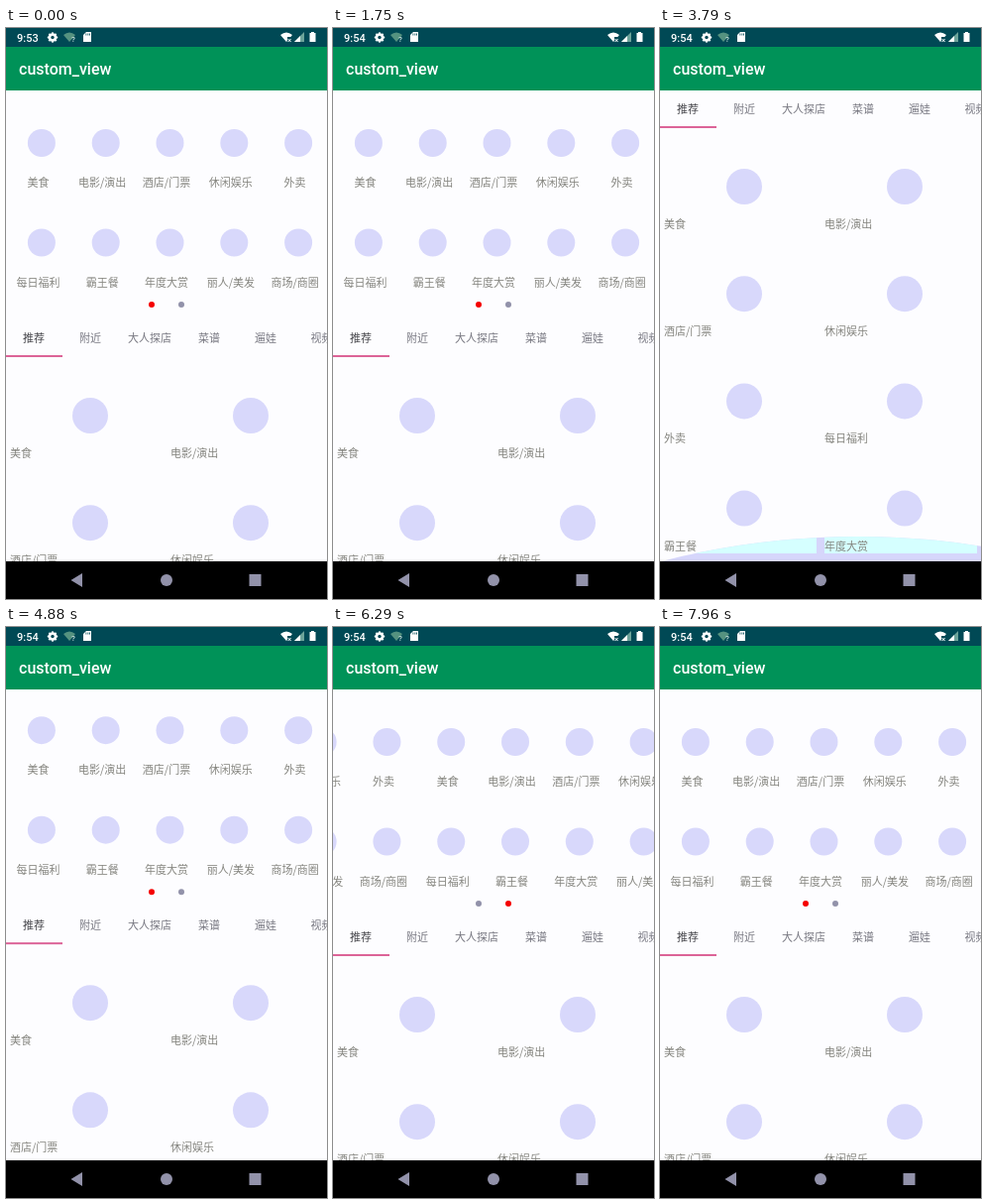
Recreate the animation shown at these times as an HTML page with a canvas. Size 324 by 576 pixels, loop 8000 ms.

```html
<!DOCTYPE html>
<html lang="zh">
<head>
<meta charset="utf-8">
<title>custom_view</title>
<style>
html, body { margin: 0; width: 100%; height: 100%; overflow: hidden; background: #fdfdff; }
canvas { display: block; width: 324px; height: 576px; }
</style>
</head>
<body>
<canvas id="stage"></canvas>
<script>
const W = 324, H = 576, LOOP = 8000, NAV_TOP = 538, BAR_BOTTOM = 63;
const COLLAPSE = 231;            // scroll distance that hides the category pager
const CELL = W / 5;
const CJK = '"Noto Sans CJK SC", "Noto Sans CJK", sans-serif';
const LATIN = 'Roboto, sans-serif';
const LAVENDER = '#d8d8fb', MUTED = '#9292aa', LABEL = '#85857f';
const items = ['美食', '电影/演出', '酒店/门票', '休闲娱乐', '外卖',
               '每日福利', '霸王餐', '年度大赏', '丽人/美发', '商场/商圈'];
const tabs = [['推荐', 28], ['附近', 85], ['大人探店', 145], ['菜谱', 205], ['遛娃', 262], ['视频', 318.5]];

const canvas = document.getElementById('stage');
const ctx = canvas.getContext('2d');
const ratio = window.devicePixelRatio || 1;
canvas.width = W * ratio;
canvas.height = H * ratio;
ctx.scale(ratio, ratio);

const progress = (t, from, to) => Math.min(1, Math.max(0, (t - from) / (to - from)));
const easeOut = u => 1 - (1 - u) ** 3;
const smooth = u => u * u * (3 - 2 * u);

function rect(x, y, w, h, color) {
  ctx.fillStyle = color;
  ctx.fillRect(x, y, w, h);
}

function circle(x, y, r, color) {
  ctx.fillStyle = color;
  ctx.beginPath();
  ctx.arc(x, y, r, 0, 7);
  ctx.fill();
}

function polygon(color, ...points) {
  ctx.fillStyle = color;
  ctx.beginPath();
  points.forEach(([x, y]) => ctx.lineTo(x, y));
  ctx.fill();
}

function text(str, x, y, color, font = '11px ' + CJK, align = 'left') {
  ctx.font = font;
  ctx.textAlign = align;
  ctx.fillStyle = color;
  ctx.fillText(str, x, y);
}

function clipped(path, draw) {
  ctx.save();
  ctx.beginPath();
  path();
  ctx.clip();
  draw();
  ctx.restore();
}

function scrollAt(t) {
  const up = smooth(progress(t, 80, 700)) - easeOut(progress(t, 960, 1640));
  const again = smooth(progress(t, 2670, 3400)) - easeOut(progress(t, 4460, 5130));
  return COLLAPSE * (up + again);
}

function pageAt(t) {
  return smooth(progress(t, 5870, 6500)) - smooth(progress(t, 6960, 7600));
}

function drawRipple(t, pageX) {
  const fade = 1 - progress(t, 7100, 7350);
  if (t < 6880 || !fade) return;
  ctx.globalAlpha = fade;
  clipped(() => ctx.rect(pageX + 1, 163, CELL - 1, 101),
          () => circle(pageX + CELL / 2, 213, 53 * easeOut(progress(t, 6880, 7080)), LAVENDER));
  ctx.globalAlpha = 1;
}

function drawPager(t, page) {
  for (let p = 0; p < 2; p++) {
    const pageX = (p - page) * W;
    if (p) drawRipple(t, pageX);
    items.forEach((name, i) => {
      const x = pageX + (i % 5 + 0.5) * CELL, y = i < 5 ? 0 : 100.5;
      circle(x + 3.5, 116 + y, 14, i === 5 && p && t > 6880 && t < 7250 ? '#c5c5c8' : LAVENDER);
      text(name, x, 160 + y, LABEL, undefined, 'center');
    });
  }
  const selected = Math.round(page);
  [147, 177].forEach((x, i) => circle(x, 279, 3, i === selected ? '#f50000' : MUTED));
}

function drawTabs() {
  tabs.forEach(([name, x], i) => text(name, x, 317, i ? '#777780' : '#45454a', undefined, 'center'));
  rect(0, 330, 57, 2, '#dc6498');
}

function drawGrid() {
  items.forEach((name, i) => {
    const x = i % 2 * 162, y = Math.floor(i / 2) * 108.2;
    circle(x + 85, 391 + y, 18, LAVENDER);
    text(name, x + 4, 433 + y, LABEL);
  });
}

// Overscroll arc at the bottom edge of the list
function drawGlow(t) {
  const size = smooth(progress(t, 3500, 3790)) * (1 - progress(t, 3850, 4290));
  if (!size) return;
  clipped(() => ctx.arc(200, 1338 - 25 * size, 800, 0, 7), () => {
    ctx.globalCompositeOperation = 'multiply';
    rect(0, 510, W, 30, LAVENDER);
    ctx.globalCompositeOperation = 'source-over';
    rect(0, 510, 158, 20, '#d5ffff');
    rect(166, 510, 154, 20, '#d5ffff');
    text(items[6], 4, 526.5, LABEL);
    text(items[7], 166, 526.5, LABEL);
  });
}

function fan(x, color) {
  ctx.fillStyle = color;
  ctx.beginPath();
  ctx.moveTo(x, 14);
  ctx.lineTo(x - 6, 7);
  ctx.quadraticCurveTo(x, 2, x + 6, 7);
  ctx.fill();
}

function drawStatusBar(t) {
  rect(0, 0, W, 19, '#004955');
  text(t < 400 ? '9:53' : '9:54', 11, 13.5, '#fff', '500 11px ' + LATIN);

  for (let i = 0; i < 8; i++) {
    const a = i * Math.PI / 4;
    circle(47 + 4 * Math.cos(a), 9.5 + 4 * Math.sin(a), 1.2, '#fff');
  }
  circle(47, 9.5, 4, '#fff');
  circle(47, 9.5, 1.7, '#004955');

  fan(64, '#559280');
  text('?', 66, 14, '#cfe5df', '500 8px ' + LATIN);
  polygon('#fff', [81, 4], [86, 4], [86, 14], [78, 14], [78, 7]);
  [80.5, 82.5, 84.2].forEach(x => rect(x, 5.5, 0.8, 2, '#004955'));

  fan(283, '#fff');
  rect(284, 9, 6, 6, '#004955');
  text('×', 284, 14.5, '#fff', '500 8px ' + LATIN);
  polygon('#6da49a', [301, 4], [301, 14], [291, 14]);
  polygon('#fff', [297, 8], [297, 14], [291, 14]);
  rect(306.5, 5, 6, 9, '#fff');
  rect(308, 4, 3, 1, '#fff');
}

function drawChrome(t) {
  drawStatusBar(t);
  rect(0, 19, W, BAR_BOTTOM - 19, '#009258');
  text('custom_view', 13, 47, '#fff', '500 16px ' + LATIN);
  rect(0, NAV_TOP, W, H - NAV_TOP, '#000');
  polygon(MUTED, [65.5, 557], [77, 550], [77, 564]);
  circle(162, 557, 6, MUTED);
  rect(245.5, 551, 12, 12, MUTED);
}

function draw(now) {
  const t = now % LOOP, scroll = scrollAt(t);
  rect(0, 0, W, H, '#fdfdff');
  clipped(() => ctx.rect(0, BAR_BOTTOM, W, NAV_TOP - BAR_BOTTOM), () => {
    ctx.save();
    ctx.translate(0, -scroll);
    drawPager(t, pageAt(t));
    drawTabs();
    drawGrid();
    ctx.restore();
    drawGlow(t);
  });
  drawChrome(t);
}

const start = performance.now();
function tick() {
  draw(performance.now() - start);
  requestAnimationFrame(tick);
}
tick();
</script>
</body>
</html>
```
